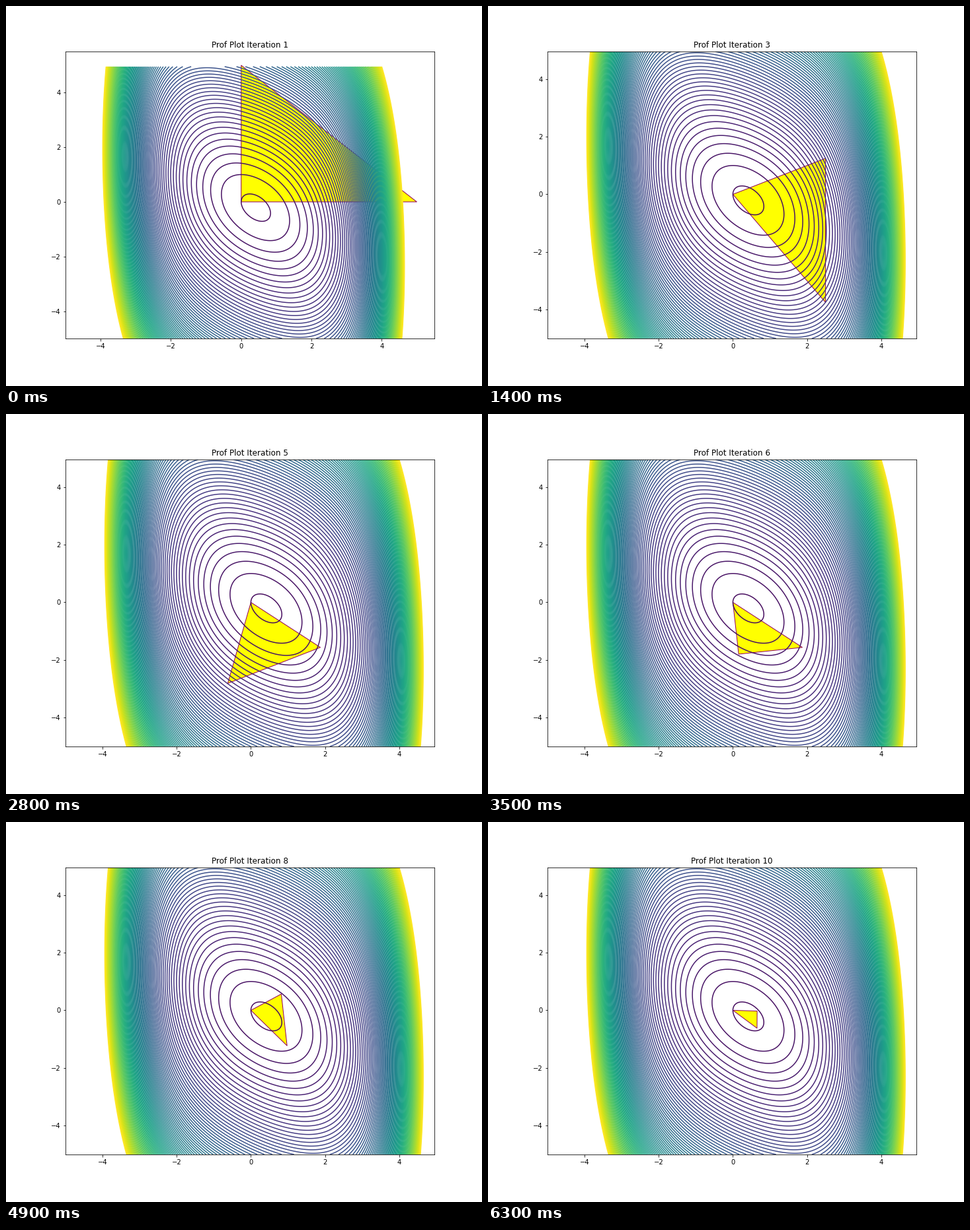
Recreate the animation shown at these times as a matplotlib script. Size 720x576 px, loop 7000 ms.

```python
import numpy as np
import matplotlib.pyplot as plt
from matplotlib.animation import FuncAnimation
from matplotlib.patches import Polygon

STEPS = 10


def f(x, y):
    return y**2 + x * y + np.exp(x) + 2 * np.exp(-x)


def simplex_steps(points, count):
    """Reflect the worst vertex if that improves it, otherwise pull it inward."""
    points = [np.array(p, float) for p in points]
    steps = [np.array(points)]
    while len(steps) < count:
        points.sort(key=lambda p: f(*p))
        *kept, worst = points
        mid = sum(kept) / len(kept)
        moved = 2 * mid - worst
        if f(*moved) >= f(*worst):
            moved = (mid + worst) / 2
        points = kept + [moved]
        steps.append(np.array(points))
    return steps


steps = simplex_steps([(0, 0), (0, 5), (5, 0)], STEPS)
grid = np.arange(-5, 5, 0.05)
X, Y = np.meshgrid(grid, grid)

plt.rcParams["font.family"] = "DejaVu Sans"
fig = plt.figure(figsize=(10, 8), dpi=72, facecolor="white")
ax = fig.add_axes([0.125, 0.125, 0.775, 0.755])
ax.contour(X, Y, f(X, Y), levels=np.arange(100), cmap="viridis", linewidths=1.5)
tri = Polygon(steps[0], closed=True, facecolor="yellow", edgecolor="#900060",
              linewidth=1, zorder=1)
ax.add_patch(tri)
ticks = np.arange(-4, 5, 2)
ax.set_xticks(ticks)
ax.set_yticks(ticks)
title = ax.set_title("", fontsize=12)


def upper(values):
    return 5.5 if values.max() > grid[-1] else grid[-1]


def draw(i):
    pts = steps[i]
    tri.set_xy(pts)
    ax.set_xlim(-5, upper(pts[:, 0]))
    ax.set_ylim(-5, upper(pts[:, 1]))
    title.set_text(f"Prof Plot Iteration {i + 1}")
    return tri, title


anim = FuncAnimation(fig, draw, frames=STEPS, interval=700, repeat=True,
                     repeat_delay=0, blit=False)
plt.show()
```
